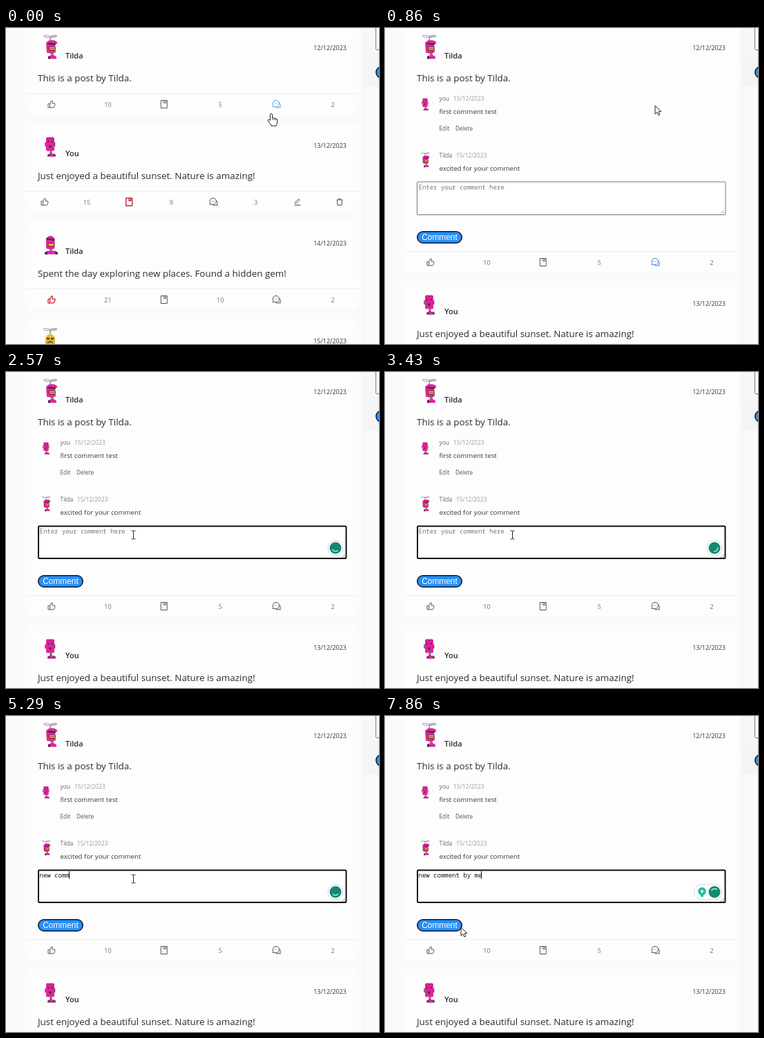
An HTML page with a canvas that plays this animation: 540x456 px, repeating every 8 s.

```html
<!DOCTYPE html>
<html lang="en">
<head>
<meta charset="utf-8">
<title>Comment feed</title>
<style>
html, body { margin: 0; width: 100%; height: 100%; overflow: hidden; background: #fbf9fb; }
canvas { display: block; }
</style>
</head>
<body>
<canvas id="stage" width="540" height="456"></canvas>
<script>
const ctx = document.getElementById('stage').getContext('2d');
const LOOP = 8000, TICK = 1000 / 7;
const OPEN = 850, FOCUS = 1700, HELPER = 1990, HINT = 5990;
const SHIFT = 228, PITCH = 141;
const SANS = '"Open Sans", "Noto Sans", sans-serif';
const MONO = '"Noto Sans Mono", monospace';
const PINK = '#e0259b', DARK = '#43283a', RED = '#c41e3a', GREY = '#55555a';

const posts = [
  { name: 'Tilda', text: 'This is a post by Tilda.', date: '12/12/2023', bot: 'visor', counts: [10, 5, 2] },
  { name: 'You', text: 'Just enjoyed a beautiful sunset. Nature is amazing!', date: '13/12/2023', bot: 'box', counts: [15, 9, 3], own: true, saved: true },
  { name: 'Tilda', text: 'Spent the day exploring new places. Found a hidden gem!', date: '14/12/2023', bot: 'dome', counts: [21, 10, 2], liked: true },
  { name: 'Orlan', text: '', date: '15/12/2023', bot: 'gold', counts: [0, 0, 0] }
];

const typed = 'new comment by me';
const keyTimes = [4000, 4140, 4280, 4570, 4710, 4850, 5000, 5140, 5420, 5570, 5570, 6000, 6140, 6280, 6420, 6570, 6850];

// [time, x, y]
const pointer = [[0, 384, 124], [140, 385, 122], [571, 391, 112], [1000, 391, 112],
  [1571, 184, 235], [7000, 184, 235], [7714, 110, 305], [LOOP, 110, 305]];
// [time, degrees]
const spin = [[2000, -60], [2143, 0], [2290, 0], [2571, 100], [4286, 705], [5286, 1170],
  [5571, 1330], [5860, 1330], [6429, 1800], [7857, 2420], [LOOP, 2480]];

const icons = {
  thumb: new Path2D('M-5-.8h2.6v5.6H-5zM-2.4-.8L-.2-5q2-.3 1.7 1.8l-.5 2h3q1.3.2 1 1.5l-1.2 3.7q-.4.8-1.3.8h-4.9'),
  save: new Path2D('M-4.5-5.5h9v11h-9zM0-5.5v4l1.3-1 1.3 1v-4'),
  chat: new Path2D('M-5.4 3.6l.6-2.2a4.7 4.7 0 1 1 2 1.9zM4.2-2A4 4 0 0 1 5.3 3l.3 2.1-2-.6A4 4 0 0 1-1.4 4M-3.2-1h.7M-1.2-1h.7M.8-1h.7'),
  edit: new Path2D('M-3.5 2.3l.5-2 4.6-4.7 1.6 1.6-4.7 4.6zM-4.5 4.5h9'),
  trash: new Path2D('M-4.5-3h9M-1.5-3v-1.4h3V-3M-3.5-3l.4 7.5h6.2L3.5-3')
};
const hand = new Path2D('M-1.5 1.2Q-1.5-.4 0-.4T1.5 1.2V6l1-.6q1.3 0 1.6 1l1.1-.4q1.2.1 1.5 1.1 2 0 2 1.8v3.5q0 2-1.4 3.6v1.2H-.2v-1L-4.6 10q-.7-1.4.5-2 .9-.3 1.8.6l.8.8z');
const arrow = new Path2D('M0 0v12.2l2.9-2.7 1.9 4.3 2.1-.9-1.9-4.2h4z');

function text(str, x, y, size, color, { font = SANS, weight = 400, align = 'left' } = {}) {
  ctx.font = `${weight} ${size}px ${font}`;
  ctx.textAlign = align;
  ctx.fillStyle = color;
  ctx.fillText(str, x, y);
}

function box(x, y, w, h, r, fill, stroke, line = 1) {
  ctx.beginPath();
  ctx.roundRect(x, y, w, h, r);
  if (fill) { ctx.fillStyle = fill; ctx.fill(); }
  if (stroke) { ctx.strokeStyle = stroke; ctx.lineWidth = line; ctx.stroke(); }
}

function disc(x, y, r, fill, stroke) {
  box(x - r, y - r, 2 * r, 2 * r, r, fill, stroke);
}

function line(points, color, width = 1) {
  ctx.beginPath();
  points.forEach(([x, y]) => ctx.lineTo(x, y));
  ctx.strokeStyle = color;
  ctx.lineWidth = width;
  ctx.stroke();
}

function at(x, y, draw, scale = 1) {
  ctx.save();
  ctx.translate(x, y);
  ctx.scale(scale, scale);
  draw();
  ctx.restore();
}

function icon(name, x, y, color = GREY) {
  at(x, y, () => {
    ctx.strokeStyle = color;
    ctx.lineWidth = color === RED ? 1.3 : 1;
    ctx.lineJoin = 'round';
    ctx.stroke(icons[name]);
  });
}

function track(keys, t) {
  if (t <= keys[0][0]) return keys[0].slice(1);
  const i = keys.findIndex(k => k[0] >= t);
  const a = keys[i - 1], b = keys[i], p = (t - a[0]) / (b[0] - a[0]);
  return a.slice(1).map((v, n) => v + (b[n + 1] - v) * p);
}

function propeller() {
  line([[0, -8], [0, -15]], '#77656e', 1.2);
  ctx.beginPath();
  ctx.ellipse(-5, -15, 5, 1.4, .1, 0, 7);
  ctx.ellipse(5, -15, 5, 1.4, -.1, 0, 7);
  ctx.strokeStyle = '#8d8288';
  ctx.lineWidth = .8;
  ctx.stroke();
}

const bots = {
  visor() {
    propeller();
    ctx.fillStyle = PINK;
    ctx.fill(new Path2D('M-6-5Q-4-10 3-9.5Q10-9 10.5-5L7-3 8 8Q2 11-5 8.5z'));
    line([[-3, -4.5], [8, -3.5]], DARK, 1.8);
    box(-1.5, 0, 9, 5, 1.5, '#e8ae30', DARK, .8);
    line([[-1, 2.5], [7, 2.5]], '#7a5420', .8);
    box(1, 9, 4, 4, 0, '#877a80');
    box(-3, 12.5, 12, 5, [4, 4, 0, 0], PINK);
    box(-3, 14, 3, 3.5, 0, DARK);
  },
  box() {
    line([[-7, -3], [-7, 3]], '#8c3068', 1.5);
    line([[6.5, -3], [6.5, 3]], '#8c3068', 1.5);
    box(-6, -10.5, 12, 20, 2, PINK);
    line([[-5, -8], [5, -8]], '#b01d78', 1);
    disc(-2.8, -4, 1.2, DARK);
    disc(2.8, -4, 1.2, DARK);
    disc(0, 3, 1.7, DARK);
    box(-.5, 9.5, 3, 4.5, 0, '#6d6069');
    box(-4, 13.5, 12, 4, [3, 3, 0, 0], '#7a3561');
    box(0, 14, 4, 3.5, 0, PINK);
  },
  dome() {
    box(-6, -9, 12.5, 19, [6, 6, 3, 3], PINK);
    line([[-6, -5], [6.5, -3]], DARK, 2.2);
    box(-3, 1.5, 9, 4.5, 2, '#e2ad38', DARK, .8);
    box(-1, 10, 4, 3, 0, '#877a80');
    box(-8, 12.5, 19, 5, [5, 5, 0, 0], PINK);
    box(-8, 14.5, 4, 3, 0, DARK);
    box(7, 14.5, 4, 3, 0, DARK);
  },
  gold() {
    propeller();
    box(-7, -8, 14, 19, [7, 7, 3, 3], '#dbb832');
    line([[-5, -2], [-1, -1.5]], DARK, 1.8);
    line([[1, -1.5], [5, -2]], DARK, 1.8);
    line([[-4, 4], [0, 2.5], [4, 4]], '#6a4a1d', 1.8);
  }
};

function drawPost(post, i, t) {
  const open = t >= OPEN;
  const y = PITCH * i + (open && i ? SHIFT : 0);
  if (y > 470) return;
  const grow = open && !i ? SHIFT : 0;
  box(28, y - 4, 483, 128.5 + grow, 12, '#fefdfe');
  line([[28, y + 94.5 + grow], [511, y + 94.5 + grow]], '#ededf0');
  at(64, y + 27, bots[post.bot]);
  text(post.name, 86, y + 44, 11, '#2b2b2e', { weight: 600 });
  text(post.date, 493, y + 31.5, 9, '#3b353b', { align: 'right' });
  text(post.text, 46, y + 77, 13.43, '#2b2b2e');

  const row = y + 110 + grow;
  const step = post.own ? 61.1 : 81.4, x0 = post.own ? 56 : 66;
  const chat = i ? GREY : t < OPEN ? '#45a4e6' : t < FOCUS ? '#3f83d6' : GREY;
  const tints = [post.liked ? RED : GREY, post.saved ? RED : GREY, chat];
  ['thumb', 'save', 'chat'].forEach((name, n) => {
    icon(name, x0 + step * 2 * n, row, tints[n]);
    const tint = !i && !n && !open ? '#96659c' : '#707074';
    text(post.counts[n], x0 + step * (2 * n + 1), row + 3.5, 9, tint, { align: 'center' });
  });
  if (post.own) {
    icon('edit', 422, row);
    icon('trash', 483, row);
  }
}

function comment(y, bot, name, nameEnd, body) {
  at(58, y + 6, bots[bot], .62);
  text(name, 78.5, y + 3, 8.4, '#666');
  text('15/12/2023', nameEnd, y + 3, 8.4, '#9a9a9e');
  text(body, 78.5, y + 21.5, 9.73, '#39393c');
}

function drawThread(t) {
  comment(102, 'box', 'you', 99, 'first comment test');
  text('Edit', 78.5, 148, 8.3, '#555');
  text('Delete', 102, 148, 8.3, '#555');
  comment(184, 'visor', 'Tilda', 103, 'excited for your comment');

  if (t >= FOCUS) box(47, 222.5, 445.5, 46.5, 1.5, '#fff', '#111', 2);
  else box(46.5, 222, 446.5, 47.5, 1, '#fff', '#767676');
  line([[486, 268], [491, 263]], '#888', .8);
  line([[489, 268], [491, 266]], '#888', .8);

  const count = keyTimes.filter(k => k <= t + 5).length;
  text(count ? typed.slice(0, count) : 'Enter your comment here', 48.5, 232.5, 9,
    count ? '#111' : '#757575', { font: MONO });
  const last = count ? keyTimes[count - 1] : FOCUS + 14;
  if (t >= FOCUS && Math.floor((t - last + 5) / 500) % 2 === 0) {
    const x = Math.round(48.5 + count * 5.4) - .5;
    line([[x, 224], [x, 235]], '#111');
  }

  box(46.75, 293.75, 64.5, 16.5, 8.25, '#2490fb', '#15181d', 1.5);
  text('Comment', 79, 306, 11.9, '#fff', { font: '"Liberation Sans", Arial, sans-serif', align: 'center' });
}

function drawHelper(t) {
  const hint = t >= HINT;
  box(hint ? 447.5 : 466, 243, hint ? 40.5 : 22, 22, 11, '#fff', '#d3d6d8');
  if (hint) {
    disc(459, 253, 5.8, '#18bd98');
    box(457, 257, 4, 4, 1, '#18bd98');
    line([[456.3, 253], [461.7, 253]], '#fff', 1.4);
    line([[459, 250.3], [459, 255.7]], '#fff', 1.4);
  }
  disc(477, 254, 8.5, '#128a73');
  const mid = track(spin, t)[0] * Math.PI / 180;
  ctx.beginPath();
  ctx.arc(477, 254, 4.8, mid - 1, mid + 1);
  ctx.strokeStyle = '#c9efe5';
  ctx.lineWidth = 1.3;
  ctx.stroke();
}

function drawPointer(t) {
  const [x, y] = track(pointer, t);
  const beam = t >= OPEN && y > 222 && y < 270;
  if (beam) {
    const ends = s => line([[-3, s * 6], [-1, s * 6], [0, s * 5], [1, s * 6], [3, s * 6]], '#222');
    at(Math.round(x) + .5, Math.round(y), () => {
      line([[0, -5.5], [0, 5.5]], '#222');
      ends(1);
      ends(-1);
    });
    return;
  }
  const isHand = t < OPEN;
  at(x, y, () => {
    const shape = isHand ? hand : arrow;
    ctx.fillStyle = '#fff';
    ctx.strokeStyle = '#222';
    ctx.lineWidth = 1;
    ctx.lineJoin = 'round';
    ctx.fill(shape);
    ctx.stroke(shape);
    if (isHand) [1.7, 4.2, 6.4].forEach(px => line([[px, 6.5], [px, 9]], '#222', .8));
  });
}

function drawSidebar() {
  const shade = ctx.createLinearGradient(0, 0, 0, 84);
  shade.addColorStop(0, '#f8f7f9');
  shade.addColorStop(1, '#f4f3f5');
  ctx.fillStyle = shade;
  ctx.fillRect(517, 0, 23, 84);
  line([[517.5, 0], [517.5, 456]], '#f0eef1');
  box(535.5, -10, 40, 41.5, 1, '#fff', '#767676');
  box(535.75, 55.75, 40, 16.5, 8.25, '#2490fb', '#15181d', 1.5);
}

function frame(now) {
  const t = Math.floor((now % LOOP + 5) / TICK) * TICK % LOOP;
  ctx.fillStyle = '#fbf9fb';
  ctx.fillRect(0, 0, 540, 456);
  drawSidebar();
  posts.forEach((post, i) => drawPost(post, i, t));
  if (t >= OPEN) drawThread(t);
  if (t >= HELPER) drawHelper(t);
  drawPointer(t);
}

const start = performance.now();
function loop() {
  frame(performance.now() - start);
  requestAnimationFrame(loop);
}
loop();
</script>
</body>
</html>
```
